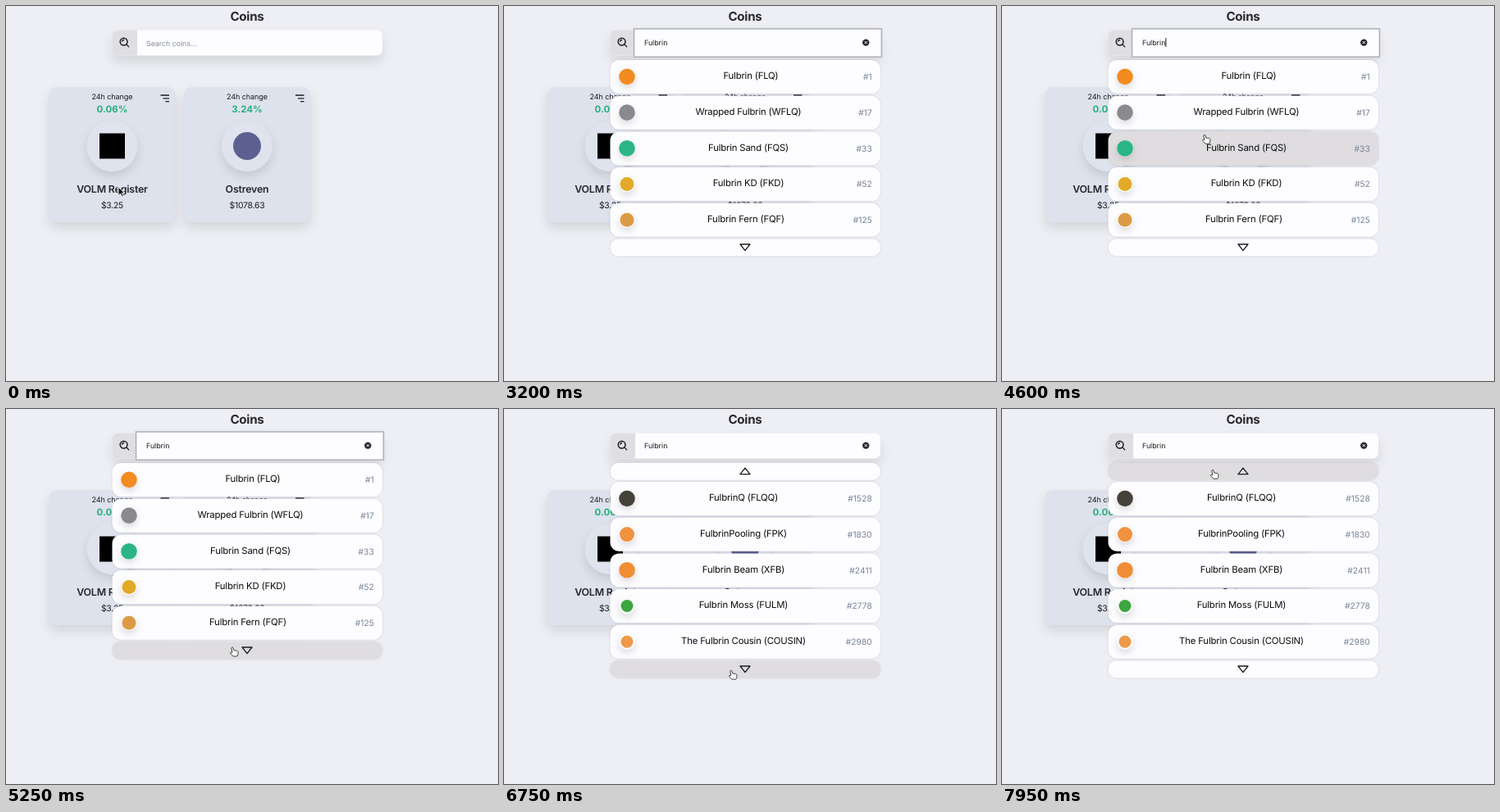
Recreate the animation shown at these times as an HTML page. Size 600 by 458 pixels, loop 8000 ms.

```html
<!DOCTYPE html>
<html lang="en">
<head>
<meta charset="utf-8">
<title>Coins</title>
<style>
  html, body { margin: 0; width: 100%; height: 100%; overflow: hidden; background: #eeeff4; }
  svg { display: block; width: 600px; height: 458px; font-family: Inter, "Open Sans", sans-serif; fill: #1c1c20; text-rendering: geometricPrecision; }
  .mid { text-anchor: middle; }
  .end { text-anchor: end; }
  .heading { font-size: 15.2px; font-weight: 700; letter-spacing: -.3px; fill: #29292e; }
  .label { font-size: 9.1px; letter-spacing: -.13px; }
  .change { font-size: 11.5px; font-weight: 700; fill: #27b07d; }
  .name { font-size: 12.4px; font-weight: 600; letter-spacing: -.2px; fill: #26262b; }
  .price { font-size: 10.4px; letter-spacing: -.25px; }
  .field { font-size: 8.8px; }
  .title { font-size: 11.4px; letter-spacing: -.2px; fill: #0c0c0e; }
  .rank { font-size: 10.3px; fill: #78869a; }
  .hint { fill: #838d9b; }
  .card { fill: #dee2ed; filter: drop-shadow(0 7px 7px rgba(0,0,0,.11)); }
  .disc { fill: #dfe3ee; filter: drop-shadow(0 6px 6px rgba(0,0,0,.11)); }
  .bar { fill: #fdfcfe; filter: drop-shadow(0 8px 7px rgba(0,0,0,.10)); }
  .item { fill: #fdfcfe; filter: drop-shadow(0 .7px .8px rgba(0,0,0,.15)); }
  .item.hot { fill: #dfdddf; }
  .coin { filter: drop-shadow(0 4px 4px rgba(0,0,0,.13)); }
  .line { fill: none; stroke: #1c1c20; stroke-width: 1.3; stroke-linejoin: round; }
</style>
</head>
<body>
<svg id="stage" viewBox="0 0 600 458">
  <text class="heading mid" x="294" y="17.5">Coins</text>
  <g id="cards"></g>
  <rect class="bar" x="129.5" y="29.5" width="329.5" height="31" rx="7"/>
  <path d="M160 29.5h-23.5a7 7 0 0 0-7 7v17a7 7 0 0 0 7 7H160z" fill="#dfdee1"/>
  <circle class="line" cx="143.6" cy="43.6" r="4.4" style="stroke-width:1.5"/>
  <path class="line" d="M146.9 46.9l2.8 2.8M141.6 43.2q.4-1.6 2-1.7" style="stroke-linecap:round"/>
  <g id="ring">
    <rect x="158.5" y="27.8" width="302" height="34.4" fill="#fdfcfe" stroke="#d2d4d7" stroke-width="2.2"/>
    <rect x="158.5" y="27.8" width="302" height="34.4" fill="none" stroke="#acafb2"/>
  </g>
  <text id="hint" class="field hint" x="171" y="48.5">Search coins...</text>
  <text id="typed" class="field" x="171" y="48"></text>
  <rect id="caret" y="39" width="1" height="11"/>
  <g id="clear">
    <circle cx="441.3" cy="44.6" r="4.2" fill="#29292d"/>
    <path d="M439.8 43.1l3 3m0-3l-3 3" stroke="#fff"/>
  </g>
  <g id="loading">
    <rect class="item" x="129.5" y="66" width="329.5" height="32.5" rx="11"/>
    <text class="field mid" x="294" y="85.5">Loading...</text>
  </g>
  <g id="lists"></g>
  <g id="cursor">
    <path data-kind="arrow" d="M0 0V10.4L2.5 8.2L4.2 12L6 11.2L4.4 7.6H7.6Z" fill="#111" stroke="#fff" stroke-width=".9"/>
    <path data-kind="beam" d="M-2-5.5q2 0 2 1.2V4.3q0 1.2-2 1.2M2-5.5q-2 0-2 1.2V4.3q0 1.2 2 1.2" fill="none" stroke="#222"/>
    <path data-kind="hand" d="M-1.2 1Q0-.8 1 1L1.8 4Q6.4 4 7.1 5.8L6.7 9.2L5.7 11.2H.8L-2.6 7.3Q-2.6 5.5-.1 6.7Z" fill="#fff" stroke="#333" stroke-width=".9"/>
  </g>
</svg>
<script>
const LOOP = 8000, QUERY = 'Fulbrin';
const LAST_KEY = 2450, FOCUS = 700, BLUR = 5550;
const KEYS = [1650, 1750, 1900, 2050, 2200, 2320, LAST_KEY];
const RESULTS = [2700, BLUR, 6750];   // when each page of results opens

// title, rank, colour, radius of the coin dot
const PAGES = [
  [['Fulbrin (FLQ)', 1, '#f28b20', 9.8], ['Wrapped Fulbrin (WFLQ)', 17, '#8b8890', 9.8],
   ['Fulbrin Sand (FQS)', 33, '#2bb585', 9.8], ['Fulbrin KD (FKD)', 52, '#e2aa26', 8.5],
   ['Fulbrin Fern (FQF)', 125, '#dd9a45', 8.5]],
  [['Fulbrin Emerald (FQE)', 533, '#cbbba5', 8.5], ['Fulbrin Max (FLQM)', 709, '#f0a560', 8.5],
   ['Weasel Savings Holding Fulbrin (SHFLQ)', 760, '#f0930f', 9.8], ['Fulbrin 7 (FLQ7)', 997, '#ee8532', 9.8],
   ['9yFulbrin (9YFLQ)', 1425, '#f0832c', 9.8]],
  [['FulbrinQ (FLQQ)', 1528, '#45423a', 9.8], ['FulbrinPooling (FPK)', 1830, '#f0913d', 9],
   ['Fulbrin Beam (XFB)', 2411, '#f08d35', 9.8], ['Fulbrin Moss (FULM)', 2778, '#3ca63f', 7.5],
   ['The Fulbrin Cousin (COUSIN)', 2980, '#ee9849', 7.5]]
];

// time, x, y of the pointer tip
const PATH = [
  [0, 137, 221], [50, 137, 221], [600, 225, 45], [3500, 225, 45], [4150, 250, 263], [4600, 247, 157],
  [5050, 268, 262], [5300, 277, 294], [6200, 277, 294], [6500, 277, 319], [7400, 277, 319],
  [7550, 277, 302], [7650, 275, 283], [7950, 257, 74], [LOOP, 257, 74]
];

const $ = id => document.getElementById(id);
const show = (el, on) => { el.style.display = on ? '' : 'none'; };
const text = (cls, x, y, s) => `<text class="${cls}" x="${x}" y="${y}">${s}</text>`;
const item = (y, h) => `<rect class="item" data-y="${y}" x="129.5" y="${y}" width="329.5" height="${h}" rx="${h > 30 ? 11 : 10}"/>`;

function card(x, change, name, price, logo) {
  const c = x + 77;
  return `<rect class="card" x="${x}" y="99" width="154" height="165" rx="9"/>
    <circle class="disc" cx="${c}" cy="171" r="31"/>${logo}
    <path class="line" d="M${x + 136} 109h10.5m-7.5 3.8h7.5m-4.5 3.8h4.5"/>`
    + text('label mid', c, 114, '24h change') + text('change mid', c, 130.2, change)
    + text('name mid', c, 228.4, name) + text('price mid', c, 247, price);
}

function row([title, rank, colour, r], y) {
  const tag = '#' + rank;
  return item(y, 41)
    + `<g class="coin"><circle cx="150" cy="${y + 20.4}" r="9.8" fill="#fafafa"/>
       <circle cx="150" cy="${y + 20.4}" r="${r}" fill="${colour}"/></g>`
    + text('title mid', 307 - 3 * tag.length, y + 23.2, title)
    + text('rank end', 448.8, y + 24.2, tag);
}

function pager(y, dir) {
  const c = y + 10.3;
  return item(y, 21) + `<path class="line" d="M288 ${c - 3.7 * dir}h12l-6 ${7.6 * dir}z"/>`;
}

function list(rows, i) {
  const top = i ? 89 : 66;
  return `<g>${i ? pager(65.7, -1) : ''}${rows.map((r, n) => row(r, top + 43.7 * n)).join('')}${pager(top + 218.4, 1)}</g>`;
}

$('cards').innerHTML =
  card(52.5, '0.06%', 'VOLM Register', '$3.25', '<rect x="114" y="155.5" width="31" height="31" fill="#000"/>') +
  card(217, '3.24%', 'Ostreven', '$1078.63', '<circle cx="294" cy="171" r="17" fill="#5b6090"/>');
$('lists').innerHTML = PAGES.map(list).join('');

const lists = [...$('lists').children];
const pointers = [...$('cursor').children];

function pointerAt(t) {
  const i = PATH.findIndex(p => p[0] > t);
  const [t0, x0, y0] = PATH[i - 1], [t1, x1, y1] = PATH[i];
  const u = (t - t0) / (t1 - t0), e = u * u * (3 - 2 * u);
  return [x0 + (x1 - x0) * e, y0 + (y1 - y0) * e];
}

function draw(t) {
  const typed = QUERY.slice(0, KEYS.filter(k => k <= t).length);
  const page = RESULTS.filter(k => k <= t).length - 1;
  const focused = t >= FOCUS && t < BLUR;
  const [x, y] = pointerAt(t);

  show($('ring'), focused);
  show($('hint'), !typed);
  show($('clear'), typed);
  $('typed').textContent = typed;
  const blinkFrom = t >= LAST_KEY ? LAST_KEY : FOCUS;
  const typing = t >= KEYS[0] && t < LAST_KEY;
  show($('caret'), focused && (typing || (t - blinkFrom) % 1000 < 500));
  $('caret').setAttribute('x', 171 + (typed ? $('typed').getComputedTextLength() : 0));
  show($('loading'), t >= KEYS[1] && page < 0);

  lists.forEach((g, i) => show(g, i === page));
  if (page >= 0) {
    const items = [...lists[page].querySelectorAll('.item')];
    const onPager = t >= 5280 && t < 7600;   // hover lingers while the list shifts
    const visible = t >= 3500;
    items.forEach((el, i) => {
      const d = y - el.dataset.y;
      const over = d >= 0 && d < +el.getAttribute('height');
      el.classList.toggle('hot', visible && (onPager ? i === items.length - 1 : over));
    });
  }

  const inField = y > 29 && y < 62;
  const kind = inField ? 'beam' : page >= 0 ? 'hand' : 'arrow';
  show($('cursor'), t < KEYS[0] || t >= 3500);
  pointers.forEach(p => show(p, p.dataset.kind === kind));
  $('cursor').setAttribute('transform', `translate(${x} ${y})`);
}

function tick() {
  draw(performance.now() % LOOP);
  requestAnimationFrame(tick);
}
tick();
</script>
</body>
</html>
```
